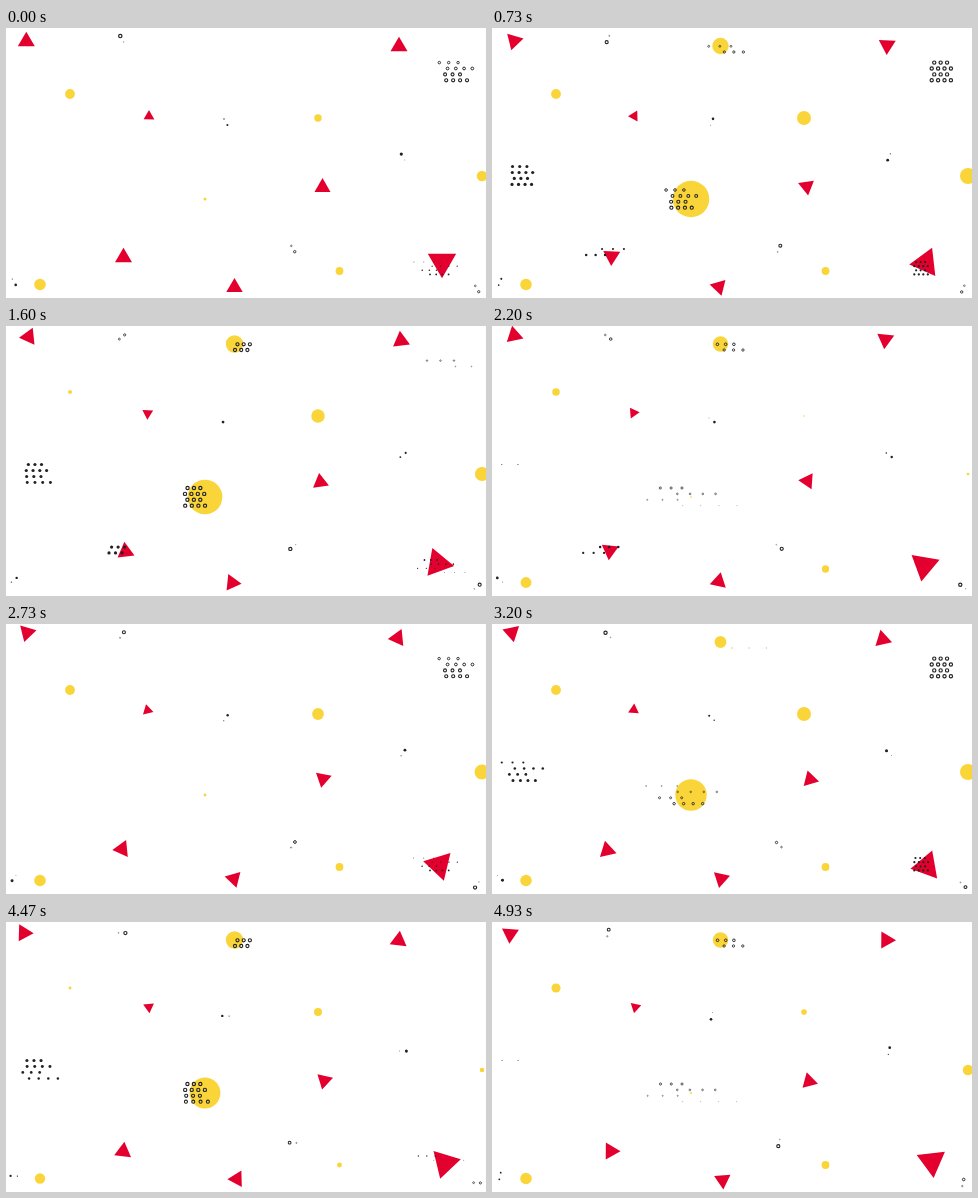
An HTML page with a canvas that plays this animation: 480 px wide and 270 px high, repeating every 4990 ms.

```html
<!DOCTYPE html>
<html>
<head>
<meta charset="utf-8">
<title>Drifting shapes</title>
<style>
html, body { margin: 0; overflow: hidden; background: #fff; }
canvas { display: block; }
</style>
</head>
<body>
<canvas id="stage" width="480" height="270"></canvas>
<script>
const ctx = document.getElementById('stage').getContext('2d');
const LOOP = 4990, CYCLE = 2733;
const YELLOW = '#fad53a', RED = '#e4002e', BLACK = '#222';

const mod = (a, n) => ((a % n) + n) % n;
const clamp = v => Math.max(0, Math.min(1, v));
const rad = degrees => degrees * Math.PI / 180;

function disc(x, y, r, color) {
  ctx.fillStyle = color;
  ctx.beginPath();
  ctx.arc(x, y, r, 0, 2 * Math.PI);
  ctx.fill();
}

function dot(x, y, r, ring) {
  if (r < 0.35) return;
  if (!ring) return disc(x, y, r, BLACK);
  ctx.strokeStyle = BLACK;
  ctx.lineWidth = r * 0.55;
  ctx.beginPath();
  ctx.arc(x, y, r * 0.77, 0, 2 * Math.PI);
  ctx.stroke();
}

// Shrinks to nothing around the time `low` and swells back
function pulse(t, x, y, size, period, low, hidden = 0) {
  const d = mod(t - low, period);
  const s = clamp((Math.min(d, period - d) - hidden) / 800);
  disc(x, y, size * (1 - (1 - s) ** 2), YELLOW);
}

// Turns about the middle of its height, so its centre of mass circles a little
function spin(t, x, y, side, speed, start = 0) {
  const h = side * Math.sqrt(3) / 2;
  ctx.save();
  ctx.translate(x, y);
  ctx.rotate(rad(start + speed * t / 1000));
  ctx.fillStyle = RED;
  ctx.beginPath();
  ctx.moveTo(0, -h / 2);
  ctx.lineTo(side / 2, h / 2);
  ctx.lineTo(-side / 2, h / 2);
  ctx.fill();
  ctx.restore();
}

// Rows slide in from alternate sides, close up, then spread away; the last row leads
function grid(t, x, y, gap, rows, start, { ring = false, flip = 0, period = CYCLE } = {}) {
  const hold = 1300, ease = 900;
  for (let row = 0; row < rows; row++) {
    const q = mod(t - start - 75 * (rows - 1 - row), period);
    const k = (q < hold ? 1 - clamp(q / ease) : clamp((q - hold) / ease)) ** 3;
    const odd = row % 2;
    const count = rows > 2 ? 3 + odd : 3;
    const left = x + (odd ? 0 : 0.4 * gap);
    const size = gap * (ring ? 0.33 : 0.25) * (1 - k) ** 1.3;
    for (let i = 0; i < count; i++) {
      const steps = odd === flip ? i - count : i + 1;
      dot(left + gap * (i + 2.5 * k * steps), y + 0.92 * gap * row, size, ring);
    }
  }
}

// Two dots orbit each other; their sizes trade places around the time `cross`
function pair(t, x, y, size, cross, ring) {
  const a = rad(60 - 0.174 * t);
  const balance = Math.sin(Math.PI * (cross - t) / 4000);
  for (const side of [1, -1]) {
    const r = size * (0.62 + 0.38 * side * balance);
    dot(x + side * 3.4 * Math.cos(a), y + side * 3.4 * Math.sin(a), r, ring);
  }
}

function draw(t) {
  ctx.fillStyle = '#fff';
  ctx.fillRect(0, 0, 480, 270);

  pulse(t, 64, 66, 4.9, 2550, 1790);
  pulse(t, 312, 90, 7, 2500, 2250);
  pulse(t, 333.5, 243, 3.9, 2567, 1600);
  pulse(t, 34, 256.5, 5.8, 2333, 1600);
  pulse(t, 476, 148, 8, 2467, 2130);
  pulse(t, 228.5, 18, 8.7, CYCLE, 2790, 60);
  pulse(t, 199, 171, 18.3, CYCLE, 2460, 240);

  spin(t, 20.3, 11, 17, -60);
  spin(t, 143, 86.7, 10.8, 39);
  spin(t, 393, 16, 17, -79);
  spin(t, 316.5, 157, 16, 70);
  spin(t, 117.5, 227, 17, -79);
  spin(t, 228.5, 257, 16.4, 60);
  spin(t, 436, 238, 28.4, -50, 180);

  grid(t, 20, 138.5, 6.5, 4, -80);
  grid(t, 179, 162, 6.4, 4, 90, { ring: true });
  grid(t, 439.7, 34.6, 6.4, 4, -610, { ring: true });
  grid(t, 229, 18.3, 6.2, 2, 370, { ring: true });
  grid(t, 103, 221, 6.5, 2, 340, { flip: 1, period: 2 * CYCLE });
  grid(t, 422.3, 234, 4.5, 4, -420);

  pair(t, 116, 11, 2.2, 5750, true);
  pair(t, 219.7, 94, 1.4, 3570, false);
  pair(t, 397, 129, 1.6, 5750, false);
  pair(t, 287, 220.8, 2.1, 3570, true);
  pair(t, 8, 254, 1.5, 950, false);
  pair(t, 471, 260.8, 2.1, 300, true);
}

function frame() {
  draw(performance.now() % LOOP);
  requestAnimationFrame(frame);
}
frame();
</script>
</body>
</html>
```
